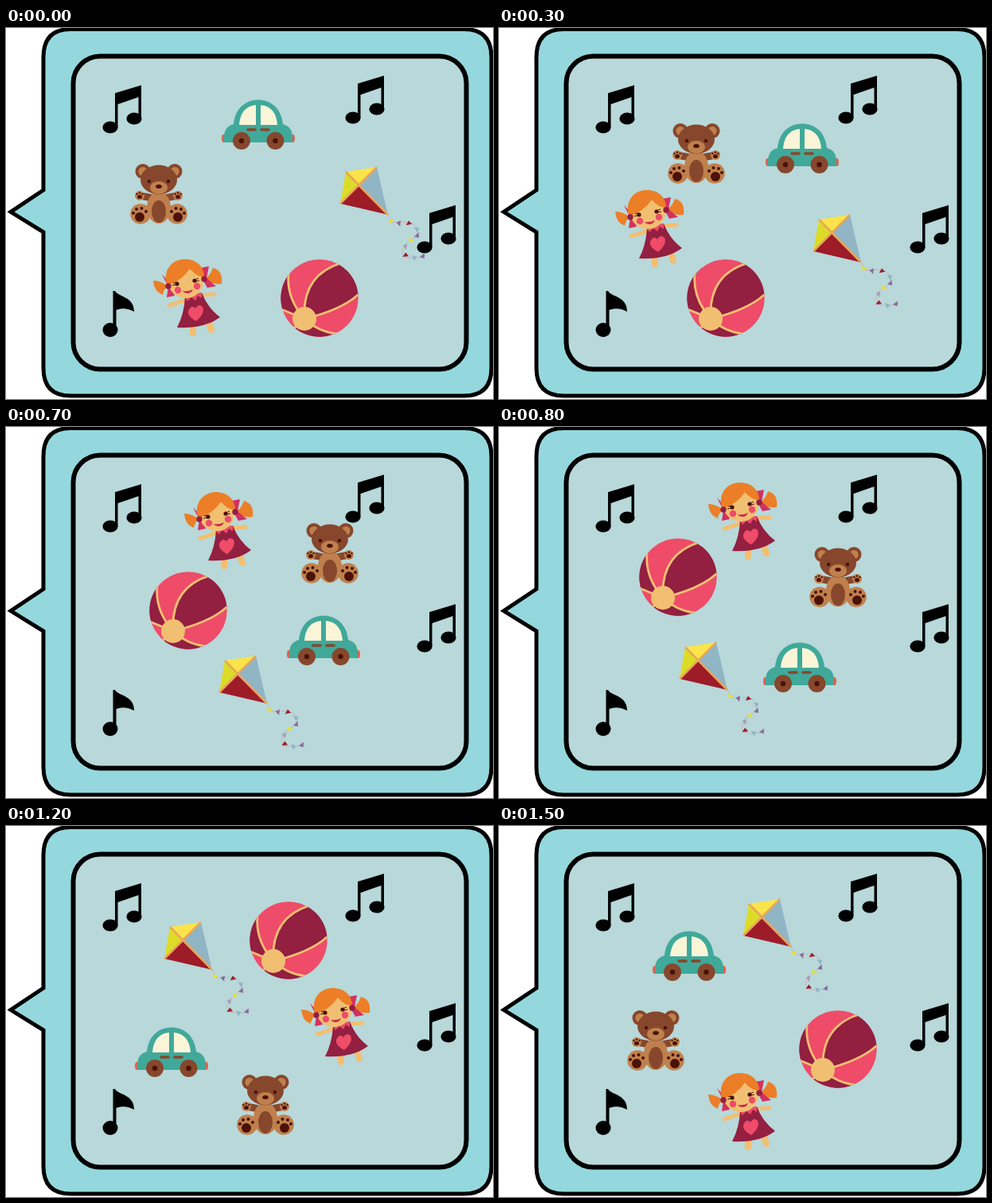
An HTML page that plays this animation: 612 by 467 pixels, repeating every 1.6 s.

```html
<!DOCTYPE html>
<html lang="en">
<head>
<meta charset="utf-8">
<title>Circling toys</title>
<style>
  html, body { margin: 0; width: 100%; height: 100%; overflow: hidden; background: #fff; }
  svg { display: block; width: 612px; height: 467px; }
</style>
</head>
<body>
<svg viewBox="0 0 612 467">
  <defs>
    <g id="notes">
      <ellipse cx="131" cy="125" rx="9.6" ry="7.6"/>
      <ellipse cx="161" cy="114" rx="9.6" ry="7.6"/>
      <path d="M137 82L170 72V114H166.500V87L140.500 96V125H137Z"/>
    </g>
    <g id="ear">
      <circle r="9.500" fill="#87472c"/>
      <circle r="5.500" fill="#c0804d"/>
    </g>
    <g id="paw">
      <circle r="6" fill="#c0804d"/>
      <ellipse cy="1.500" rx="3" ry="2.500"/>
      <circle cx="-3.500" cy="-2" r="1.200"/><circle cy="-3.500" r="1.200"/><circle cx="3.500" cy="-2" r="1.200"/>
    </g>
    <g id="foot">
      <circle r="12.800" fill="#c0804d"/>
      <circle cx="-1" cy="4" r="6"/>
      <circle cx="-9" cy="-1" r="2"/><circle cx="-5" cy="-6" r="2"/><circle cx="1.500" cy="-7" r="2"/><circle cx="7" cy="-3" r="2"/>
    </g>
    <g id="wheel">
      <circle r="11" fill="#87472c"/>
      <circle r="3.200" fill="#4a1208"/>
    </g>
    <clipPath id="round"><circle r="48.700"/></clipPath>
  </defs>

  <path d="M47 204V37Q47 1.500 81 1.500H576Q610 1.500 610 37V428Q610 463 576 463H81Q47 463 47 428V257L6 231.500Z"
        fill="#94d8dd" stroke="#000" stroke-width="5"/>
  <rect x="84.500" y="35.500" width="494" height="394" rx="34" fill="#b8d8da" stroke="#000" stroke-width="6"/>

  <use href="#notes"/>
  <use href="#notes" x="305" y="-12"/>
  <use href="#notes" x="395" y="151"/>
  <ellipse cx="131" cy="380" rx="9.500" ry="9"/>
  <path d="M134.500 331H137C142 339 161 338 161 357C154 353 146 352 138.500 355V380H134.500Z"/>

  <g id="kite">
    <path d="M60 60L66 70Q85 68 92 72C101 78 98 88 88 92C78 98 76 110 82 113Q92 117 108 111" fill="none" stroke="#c9b5ba" stroke-width="1"/>
    <g id="flags"></g>
    <path d="M7 6L46 0L23 24Z" fill="#fbe44b"/>
    <path d="M7 6L23 24L0 46Z" fill="#dcdc28"/>
    <path d="M46 0L60 60L23 24Z" fill="#90b5c5"/>
    <path d="M0 46L23 24L60 60Z" fill="#9e1b28"/>
    <path d="M7 6L60 60M46 0L0 46" stroke="#e9a65a" stroke-width="2.600"/>
  </g>

  <g id="ball">
    <g clip-path="url(#round)">
      <circle r="49" fill="#ee4c68"/>
      <g fill="#931f41" stroke="#f1bf72" stroke-width="2.800">
        <path d="M-19 26Q-42 0 -39 -31L-60 -31V8L-48 14Z"/>
        <path d="M-19 26Q-22 -29 27 -44L60 -40V-8L48 -4Q27 15 -19 26Z"/>
        <path d="M-19 26Q-2 42 21 45L10 60H-40L-31 37Z"/>
      </g>
    </g>
    <circle cx="-19" cy="26" r="15" fill="#f1bf72"/>
  </g>

  <g id="doll">
    <g stroke="#f1bf72" stroke-linecap="round" fill="none">
      <path d="M42 51L20 58M60 45L77 44" stroke-width="5"/>
      <path d="M50 82V93M70 80L73 89" stroke-width="8"/>
    </g>
    <path d="M40 47L61 42Q68 61 84 73Q64 88 30 86Q39 69 40 47Z" fill="#931f41"/>
    <path d="M39 47L43 53L48 48L53 52L56 46L61 49L61 42Z" fill="#ee4c68"/>
    <path d="M54 78C45 73 42 68 45 63Q49 57 53 62Q57 55 62 60C65 66 60 73 54 78Z" fill="#ee4c68"/>
    <path d="M18 34Q10 27 0 27Q1 41 12 45Q13 38 18 34Z" fill="#ec7e27"/>
    <path d="M65 25Q72 20 75 11Q88 14 86 31Q76 33 65 25Z" fill="#ec7e27"/>
    <path d="M11 19L21 30L27 46L17 48L19 35Z" fill="#d3315f"/>
    <path d="M59 11L70 9L67 24L79 34L68 36L63 27Z" fill="#d3315f"/>
    <ellipse cx="41" cy="28" rx="22" ry="21" transform="rotate(-10 41 28)" fill="#f1bf72"/>
    <path d="M16 28C14 10 26 0 40 0C54 0 64 9 64 22Q54 22 46 12Q36 27 18 33Z" fill="#ec7e27"/>
    <circle cx="19" cy="34" r="3.700" fill="#931f41"/>
    <circle cx="64" cy="25" r="3.700" fill="#931f41"/>
    <circle cx="31" cy="39" r="4.200" fill="#ee4c68"/>
    <circle cx="55" cy="34" r="4.200" fill="#ee4c68"/>
    <g fill="#4a1208">
      <circle cx="30" cy="31" r="2.600"/><circle cx="52" cy="27" r="2.600"/>
      <path d="M25 30L30 29M24 33L29 32M52 26L57 24M53 28L58 27" stroke="#4a1208"/>
    </g>
    <path d="M37 40Q44 41 50 38Q48 43 43 43Q39 43 37 40Z" fill="#c92f4c"/>
  </g>

  <g id="bear" fill="#4a1208">
    <use href="#ear" x="16" y="9.500"/><use href="#ear" x="56" y="9.500"/>
    <path d="M12 40L28 43M60 40L44 43" stroke="#87472c" stroke-width="9"/>
    <ellipse cx="36" cy="55" rx="15" ry="20" fill="#c0804d"/>
    <ellipse cx="36" cy="60" rx="9" ry="14" fill="#87472c"/>
    <use href="#paw" x="12" y="40"/><use href="#paw" x="60" y="40"/>
    <use href="#foot" x="13" y="63"/><use href="#foot" transform="translate(59 63) scale(-1 1)"/>
    <ellipse cx="36" cy="20" rx="23" ry="18.500" fill="#87472c"/>
    <ellipse cx="36" cy="30" rx="11" ry="8" fill="#c0804d"/>
    <ellipse cx="36" cy="28.500" rx="3.800" ry="2.500"/>
    <circle cx="24" cy="22" r="2.200"/><circle cx="48" cy="22" r="2.200"/>
  </g>

  <g id="car">
    <ellipse cx="2.500" cy="49" rx="2.500" ry="5" fill="#e0604f"/>
    <ellipse cx="89.500" cy="49" rx="2.500" ry="5" fill="#e0604f"/>
    <path d="M3 54V48Q3 34 15 31C17 11 30 0.500 46 0.500S75 11 77 31Q89 34 89 48V54Z" fill="#40a99a"/>
    <path d="M22 32C23 17 30 8 43 7V32ZM70 32C69 17 62 8 49 7V32Z" fill="#fbf5d8"/>
    <path d="M33 38H42M50 38H59" stroke="#87472c" stroke-width="3.600" stroke-linecap="round"/>
    <use href="#wheel" x="25" y="52"/><use href="#wheel" x="67.500" y="52"/>
  </g>
</svg>
<script>
  const POSES = 15, STEP = 100, LOOP = 1600;

  // Waypoints on each toy's closed path: [pose, x, y].
  const paths = {
    car: [[0, 271, 90], [2, 335, 120], [4, 371, 169], [7, 332, 271], [9, 243, 326], [11, 162, 253], [13, 146, 176], [14, 193, 132]],
    bear: [[0, 156, 171], [2, 212, 120], [4, 287, 90], [7, 390, 151], [9, 378, 250], [11, 290, 313], [14, 161, 232]],
    doll: [[0, 185, 291], [2, 146, 204], [4, 163, 139], [7, 263, 70], [9, 364, 120], [11, 371, 204], [14, 263, 311]],
    ball: [[0, 394, 340], [2, 285, 340], [4, 249, 312], [7, 225, 189], [9, 306, 121], [11, 355, 144], [14, 426, 281]],
    kite: [[0, 420, 175], [1, 405, 205], [2, 395, 235], [4, 351, 273], [6, 268, 288], [7, 227, 271], [9, 142, 170], [11, 199, 121], [14, 307, 92]]
  };

  const flags = [[64, 68, "#e9df35"], [74, 71, "#8a6a9c"], [86, 71, "#9e1b28"], [96, 78, "#90b5c5"], [97, 86, "#8a6a9c"],
    [89, 92, "#e9df35"], [82, 100, "#a99cb5"], [82, 111, "#9e1b28"], [93, 114, "#90b5c5"], [104, 112, "#8a6a9c"]];
  document.getElementById("flags").innerHTML = flags.map(([x, y, color], i) =>
    `<path d="M-3-3L4 0L-2 3Z" fill="${color}" transform="translate(${x} ${y}) rotate(${i * 73})"/>`).join("");

  // Waypoint i of a closed path, unwrapped in pose.
  function waypoint(path, i) {
    const n = path.length, [pose, x, y] = path[(i + n) % n];
    return [pose + Math.floor(i / n) * POSES, x, y];
  }

  // Slope at a waypoint, flat at turning points so the path never overshoots.
  function slope(path, i, axis) {
    const [a, b, c] = [i - 1, i, i + 1].map(j => waypoint(path, j));
    const turns = (b[axis] - a[axis]) * (c[axis] - b[axis]) <= 0;
    return turns ? 0 : (c[axis] - a[axis]) / (c[0] - a[0]);
  }

  function place(path, pose, axis) {
    let i = path.length - 1;
    while (path[i][0] > pose) i--;
    const a = waypoint(path, i), b = waypoint(path, i + 1);
    const span = b[0] - a[0], u = (pose - a[0]) / span, v = 1 - u;
    return Math.round(v * v * (1 + 2 * u) * a[axis] + u * u * (1 + 2 * v) * b[axis]
      + span * u * v * (v * slope(path, i, axis) - u * slope(path, i + 1, axis)));
  }

  function draw(now) {
    const tick = Math.floor(now % LOOP / STEP);
    const pose = tick < 2 ? tick : tick - 1; // the second pose is held twice as long
    for (const id in paths) {
      const [x, y] = [1, 2].map(axis => place(paths[id], pose, axis));
      document.getElementById(id).setAttribute("transform", `translate(${x} ${y})`);
    }
  }

  const start = performance.now();
  function frame() {
    draw(performance.now() - start);
    requestAnimationFrame(frame);
  }
  frame();
</script>
</body>
</html>
```
